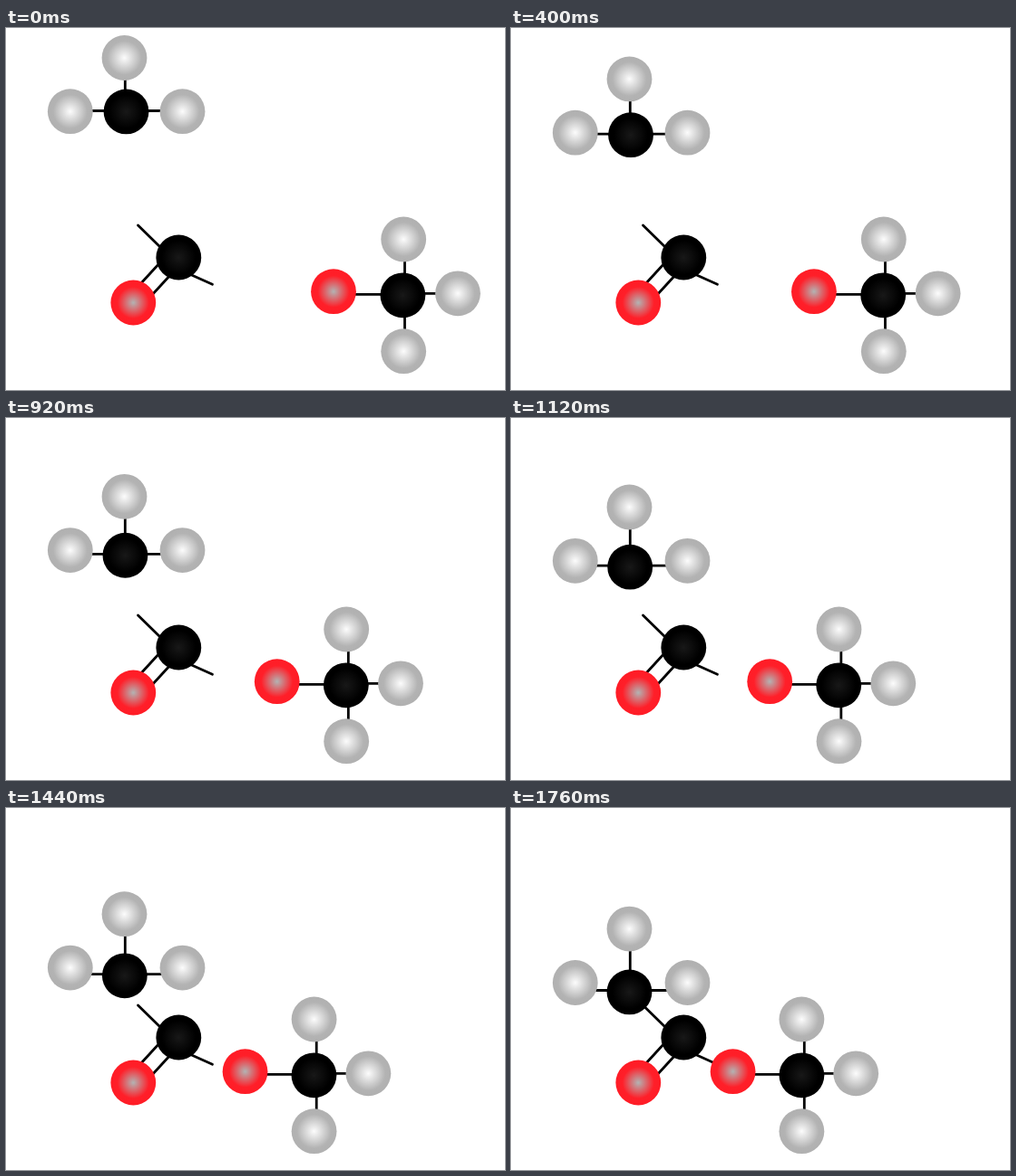
Recreate the animation shown at these times as an HTML page. Size 550x400 px, loop 2160 ms.

```html
<!DOCTYPE html>
<html lang="en">
<head>
<meta charset="utf-8">
<title>Ester molecule assembling</title>
<style>
html, body { margin: 0; width: 100%; height: 100%; overflow: hidden; background: #fff; }
svg { display: block; width: 550px; height: 400px; }
line { stroke: #000; stroke-width: 2.8; stroke-linecap: round; }
</style>
</head>
<body>
<svg id="stage" viewBox="0 0 550 400">
  <defs>
    <radialGradient id="H"><stop offset="0" stop-color="#fcfcfc"/><stop offset=".75" stop-color="#b3b3b3"/><stop offset="1" stop-color="#b0b0b0"/></radialGradient>
    <radialGradient id="O"><stop offset="0" stop-color="#b3b3b3"/><stop offset=".7" stop-color="#ff1f29"/><stop offset="1" stop-color="#ff1c26"/></radialGradient>
    <radialGradient id="C"><stop offset="0" stop-color="#181818"/><stop offset=".75" stop-color="#000"/></radialGradient>
  </defs>
</svg>
<script>
const STEP = 40, MOVE_STEPS = 43, LOOP = 2160, RADIUS = 24.9;
const stage = document.getElementById('stage');
const movers = [];

function add(tag, attrs, dx, dy) {
  const el = document.createElementNS('http://www.w3.org/2000/svg', tag);
  for (const name in attrs) el.setAttribute(name, attrs[name]);
  stage.append(el);
  if (dx || dy) movers.push({ el, dx, dy });
}
// dx, dy: total travel over the whole move
const bond = (x1, y1, x2, y2, dx = 0, dy = 0) => add('line', { x1, y1, x2, y2 }, dx, dy);
const atom = (kind, cx, cy, dx = 0, dy = 0) =>
  add('circle', { cx, cy, r: RADIUS, fill: `url(#${kind})` }, dx, dy);

// carbonyl bonds
bond(145.5, 218, 172, 244);
bond(203, 272.3, 227.5, 283.2);
bond(148, 283, 170, 259);
bond(160, 296, 182, 272);

// methyl bonds
bond(80, 91.5, 185, 91.5, 0, 110);
bond(131.3, 45, 131.3, 85, 0, 105);

// methoxy bonds
bond(370, 294.4, 437, 294.4, -116.5);
bond(440, 293.4, 490, 293.4, -117);
bond(439.5, 240, 439.5, 350, -116.2);

// carbonyl
atom('C', 190.3, 253.5);
atom('O', 140.3, 303.5);

// methyl
atom('H', 130.5, 33, 0, 100.6);
atom('H', 70.8, 92.2, 0, 100.8);
atom('H', 194.5, 92.2, 0, 100.8);
atom('C', 132.5, 92.4, -2, 111);

// methoxy
atom('H', 438.2, 233.5, -117.8);
atom('H', 498, 293.3, -117.8);
atom('H', 438.2, 357.2, -117.8);
atom('O', 361, 291.2, -116.4);
atom('C', 437.4, 295.3, -117);

const start = performance.now();
function draw() {
  const step = Math.floor(((performance.now() - start) % LOOP) / STEP);
  const p = Math.min(step / MOVE_STEPS, 1);
  for (const { el, dx, dy } of movers) {
    el.setAttribute('transform', `translate(${dx * p} ${dy * p})`);
  }
  requestAnimationFrame(draw);
}
draw();
</script>
</body>
</html>
```
